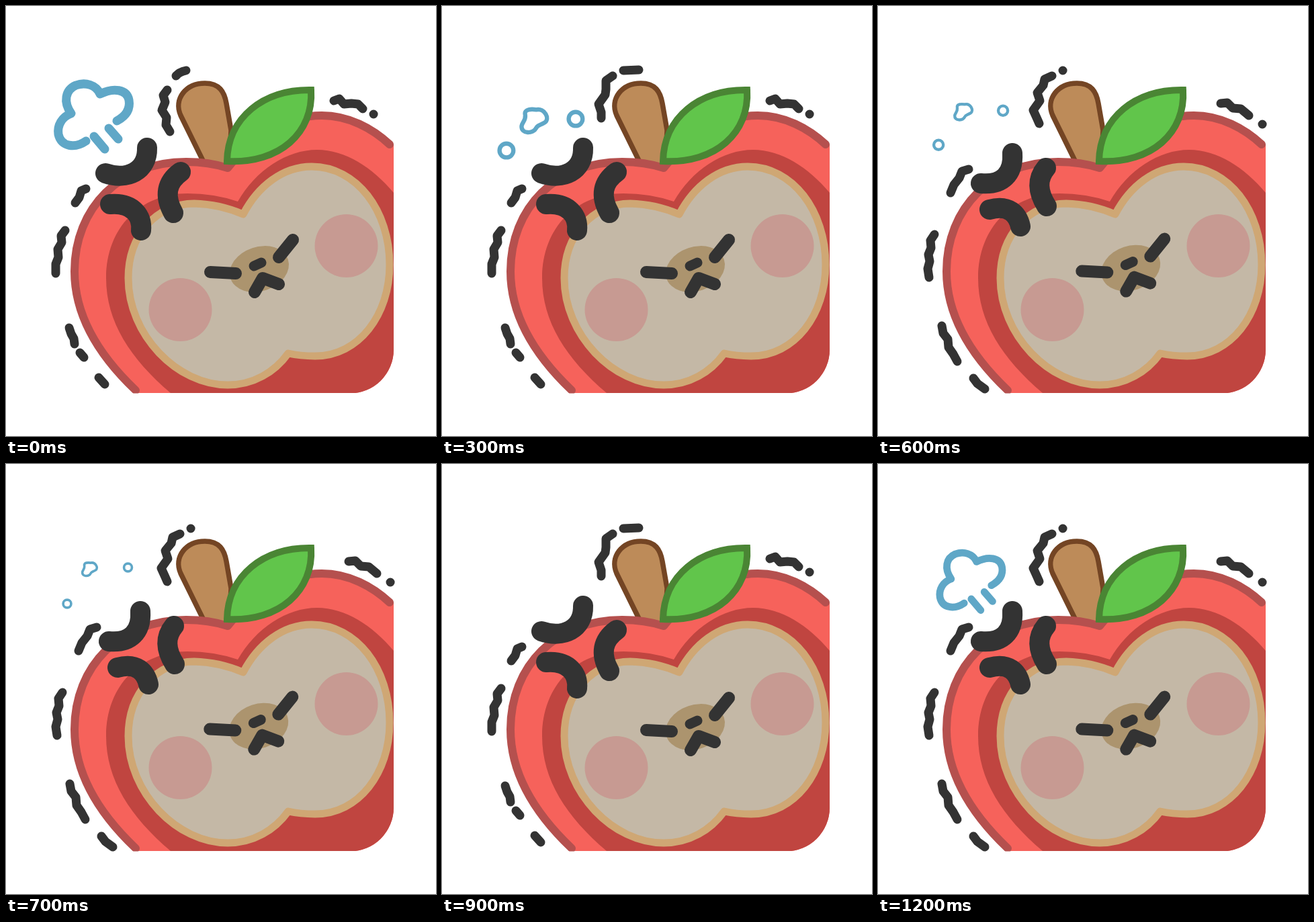
These frames come from a looping animation (640 by 640 pixels, 1400 ms). An HTML page with a canvas:

```html
<!DOCTYPE html>
<html lang="en">
<head>
<meta charset="utf-8">
<title>Angry apple</title>
<style>
html, body { margin: 0; width: 100%; height: 100%; overflow: hidden; background: #fff; }
canvas { display: block; width: 100vmin; height: 100vmin; }
</style>
</head>
<body>
<canvas id="stage" width="640" height="640"></canvas>
<script>
const ctx = document.getElementById('stage').getContext('2d');
const INK = '#333', BLUE = '#5fa7c7', LOOP = 1400;
const P = d => new Path2D(d);

const body = 'M193 572C133 515 102 455 102 395C102 300 170 232 268 232Q302 232 330 241C370 190 420 163 470 163C510 163 545 182 571 206';
const shape = {
  stem: P('M294 232L260 163C249 138 268 115 296 115C318 115 325 128 328 145L335 185L332 242'),
  fill: P(body + 'L577 206V576H193Z'),
  rim: P(body),
  shade: P('M245 576C185 525 149 470 149 405C149 330 200 279 270 279Q310 279 345 291C372 244 418 214 463 214C505 214 545 240 577 278V576Z'),
  flesh: P('M353 310C375 268 412 239 455 239C522 239 571 305 571 385C571 460 525 521 460 521Q438 521 420 517C400 545 368 564 330 564C255 564 182 490 182 405C182 340 225 294 280 294Q318 295 353 310Z'),
  leaf: P('M329 231C330 166 383 124 454 125C458 188 408 235 329 231Z'),
  face: P('M304 396L342 398M406 374L427 348M370 426L382 405L406 414'),
  nose: P('M369 387L380 382'),
  cloud: P('M165 171C180 163 185 152 183 140C180 124 160 121 140 131C134 117 118 113 104 118C88 125 85 143 97 160C83 165 76 178 78 191C82 210 103 212 119 201M131 194L147 213M153 182L167 198'),
  blob: P('M-14-9C-17-20-2-19 4-18C18-21 27-3 18 3C10 8 6 7 4 12C-1 22-21 22-20 9C-19 2-13 0-14-9Z')
};

// Trembling strokes and the temper mark for each pose
const sidesA = 'M119 272L112 275L109 285L103 293M88 334L82 342L83 352L77 362L78 374L74 384L74 398M94 479L97 488L101 495L102 503M110 516L116 523M138 553L147 563M488 141L496 138L503 146L514 145L524 146L531 153M547 161h.1';
const markA = P('M148 249C180 260 211 246 210 211M260 247Q228 270 249 308M155 295C190 292 203 314 201 334');
const poses = {
  A: { dy: 0, mark: markA, width: 30,
    lines: P(sidesA + 'M253 104Q258 98 268 96M240 125L234 133L237 143L232 155L239 166L238 177L244 187') },
  D: { dy: 0, mark: markA, width: 30,
    lines: P(sidesA + 'M270 96L293 95M254 104L244 111L244 124L243 132L233 146L237 158L237 167') },
  B: { dy: -1.4, mark: P('M153 264C185 267 202 250 200 219M250 241Q230 265 251 298M166 303C195 295 208 310 212 328'), width: 30,
    lines: P('M135 243L125 246L121 256L113 266L108 278M84 340L78 349L79 360L75 370L77 380L74 391L76 404M95 476L97 487L104 496L105 508L112 518L118 529M142 554L148 562L159 570M510 145L520 144L528 152L540 153L552 163M572 176h.1M275 96h.1M259 104L248 109L246 118L237 129L241 141L231 155L236 166L240 175') },
  C: { dy: 0, mark: P('M153 270C183 270 195 250 191 221M243 235C230 255 238 275 252 290M170 307C195 297 210 305 218 324'), width: 28,
    lines: P('M135 250L122 252L117 264L110 270L104 283L101 293M84 357L83 360M78 397L80 405L78 413L82 422L82 430M100 491L107 508M118 526L123 534M151 562L160 571M527 150L536 148L545 157L553 158L559 166M574 177h.1M265 98Q275 94 286 92M248 114L239 122L242 135L236 143L239 155L236 167L243 178L246 188') }
};
const steps = [[0, 'A'], [200, 'B'], [300, 'D'], [400, 'B'], [470, 'D'], [600, 'B'], [650, 'D'],
  [700, 'B'], [800, 'D'], [900, 'D'], [1000, 'C'], [1200, 'B']];

// time: scale, left, top
const clouds = { 0: [1, 71, 110], 1000: [.66, 106, 157], 1200: [.88, 86, 127] };
// time, scale, then the centres of blob, right ring, left ring
const bubbles = [
  [200, 1, 140.5, 177.5, 203, 174, 100, 221],
  [470, .75, 130, 159, 192, 158, 89, 205],
  [700, .52, 124, 156.5, 181.5, 154, 91, 208],
  [900, 0, 120, 156, 177, 153, 91, 208]
];

function stroke(path, color, width) {
  ctx.strokeStyle = color;
  ctx.lineWidth = width;
  ctx.stroke(path);
}

function fill(path, color) {
  ctx.fillStyle = color;
  ctx.fill(path);
}

function oval(x, y, rx, ry, turn = 0) {
  const p = new Path2D();
  p.ellipse(x, y, rx, ry, turn, 0, 7);
  return p;
}

function placed(x, y, k, draw) {
  ctx.save();
  ctx.translate(x, y);
  ctx.scale(k, k);
  draw();
  ctx.restore();
}

function drawApple(dy) {
  ctx.save();
  ctx.beginPath();
  ctx.roundRect(0, 0, 577, 576.5, [0, 0, 65, 0]);
  ctx.clip();
  fill(shape.stem, '#bd8b59');
  stroke(shape.stem, '#744524', 7.5);
  fill(shape.fill, '#f6625b');
  fill(shape.shade, '#c04540');
  stroke(shape.rim, '#b5504e', 12);
  fill(shape.flesh, '#c4b8a6');
  stroke(shape.flesh, '#cfa774', 11);
  fill(oval(506.5, 357, 47, 47), '#c79a92');
  fill(oval(259.5, 452, 47, 47), '#c79a92');
  fill(shape.leaf, '#61c54b');
  ctx.lineJoin = 'miter';
  stroke(shape.leaf, '#4a8534', 10);
  ctx.lineJoin = 'round';
  ctx.translate(dy / 2, dy);
  fill(oval(377, 391.5, 45, 33, -.32), '#ac946e');
  stroke(shape.face, INK, 18);
  stroke(shape.nose, INK, 15);
  ctx.restore();
}

function drawBubbles(t) {
  const i = t < 470 ? 0 : t < 700 ? 1 : 2;
  const a = bubbles[i], b = bubbles[i + 1];
  const f = (t - a[0]) / (b[0] - a[0]);
  const [, k, ...at] = a.map((v, n) => v + (b[n] - v) * f);
  const ring = oval(0, 0, 11.4, 11.4);
  [shape.blob, ring, ring].forEach((path, n) =>
    placed(at[2 * n], at[2 * n + 1], k, () => stroke(path, BLUE, 7)));
}

function drawCloud([k, x, y]) {
  placed(x, y, k, () => {
    ctx.translate(-71, -110);
    stroke(shape.cloud, BLUE, 13 * Math.sqrt(k));
  });
}

function frame(now) {
  const t = now % LOOP;
  const [start, name] = steps.findLast(s => s[0] <= t);
  const pose = poses[name];
  ctx.fillStyle = '#fff';
  ctx.fillRect(0, 0, 640, 640);
  ctx.lineCap = ctx.lineJoin = 'round';
  drawApple(pose.dy);
  if (clouds[start]) drawCloud(clouds[start]);
  else if (start < 900) drawBubbles(start);
  stroke(pose.lines, INK, 13);
  stroke(pose.mark, INK, pose.width);
  requestAnimationFrame(frame);
}

requestAnimationFrame(frame);
</script>
</body>
</html>
```
